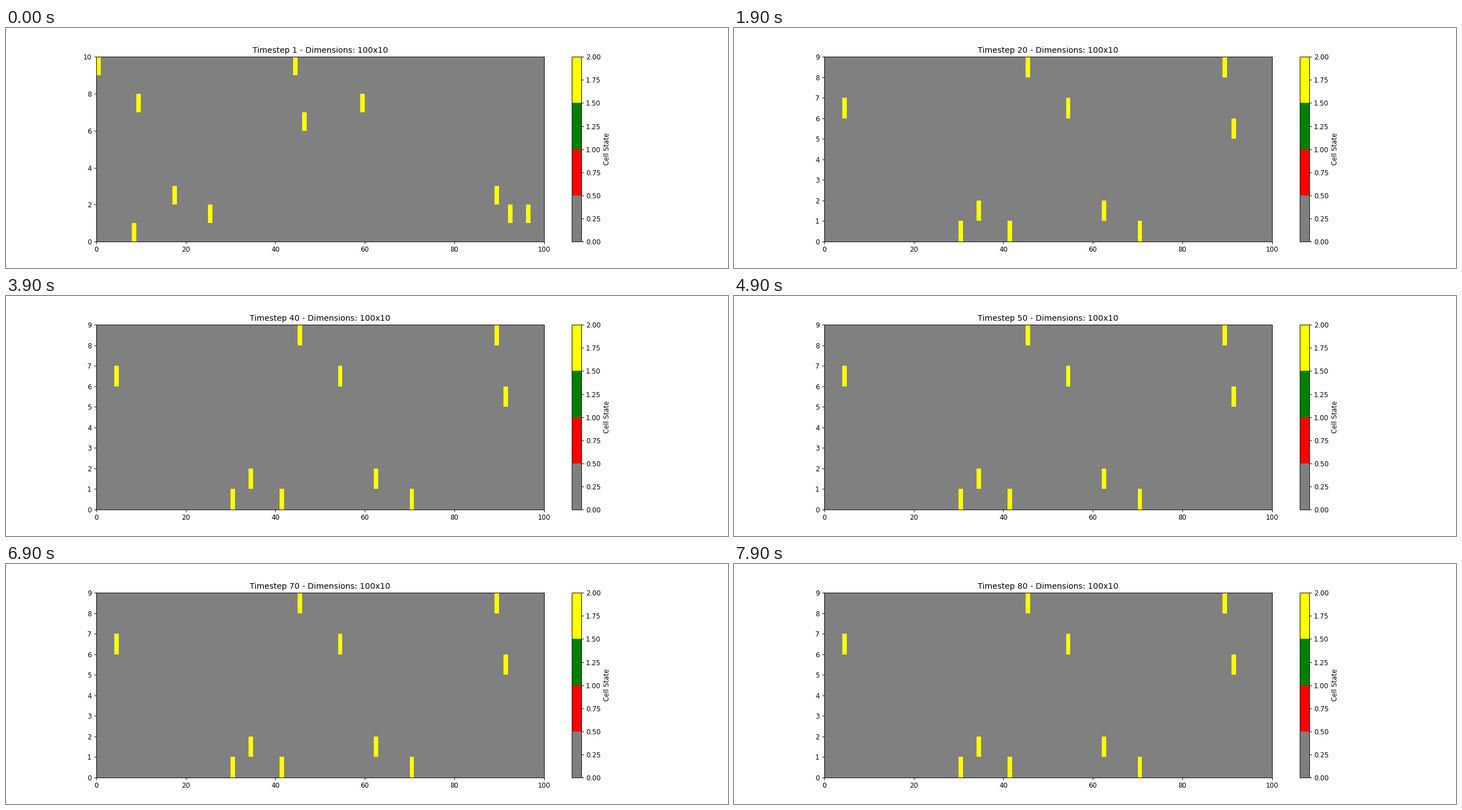
Animation, 1280 px wide and 427 px high, one loop 8000 ms. Source, as a matplotlib script:

```python
import matplotlib.pyplot as plt
import numpy as np
from matplotlib.animation import FuncAnimation
from matplotlib.cm import ScalarMappable
from matplotlib.colors import ListedColormap, Normalize

LENGTH, LANES, STEPS, VMAX = 100, 10, 80, 10
DPI = 256 / 3
CAR = 2

# lane -> starting columns, in driving order
START = {0: [8], 1: [25, 92, 96], 2: [17, 89], 6: [46], 7: [9, 59], 9: [0, 44]}

plt.rcParams["font.family"] = "DejaVu Sans"


def drive(pos, speed):
    """Speed up by one, but never past the car ahead; the road is a ring."""
    if len(pos) > 1:
        gap = (np.roll(pos, -1) - pos - 1) % LENGTH
    else:
        gap = np.full(1, LENGTH - 1)
    speed = np.minimum(np.minimum(speed + 1, VMAX), gap)
    return (pos + speed) % LENGTH, speed


def simulate():
    lanes = {y: (np.array(xs), np.zeros(len(xs), int)) for y, xs in START.items()}
    grids = []
    for _ in range(STEPS):
        grid = np.zeros((LANES, LENGTH))
        for y, (pos, _speed) in lanes.items():
            grid[y, pos] = CAR
        grids.append(grid)
        lanes = {y: drive(*state) for y, state in lanes.items()}
    return grids


grids = simulate()
cmap = ListedColormap(["gray", "red", "green", "yellow"])
norm = Normalize(0, 2)

fig, ax = plt.subplots(figsize=(1280 / DPI, 427 / DPI), dpi=DPI)
fig.colorbar(ScalarMappable(norm, cmap), ax=ax, label="Cell State")


def draw(i):
    ax.clear()
    # the lowest lane is only shown at the start
    grid = grids[i] if i == 0 else grids[i][1:]
    mesh = ax.pcolormesh(grid, cmap=cmap, norm=norm)
    title = ax.set_title(f"Timestep {i + 1} - Dimensions: {LENGTH}x{LANES}")
    return mesh, title


anim = FuncAnimation(fig, draw, frames=STEPS, init_func=lambda: draw(0),
                     interval=100, repeat=True, repeat_delay=0, blit=False)
plt.show()
```
